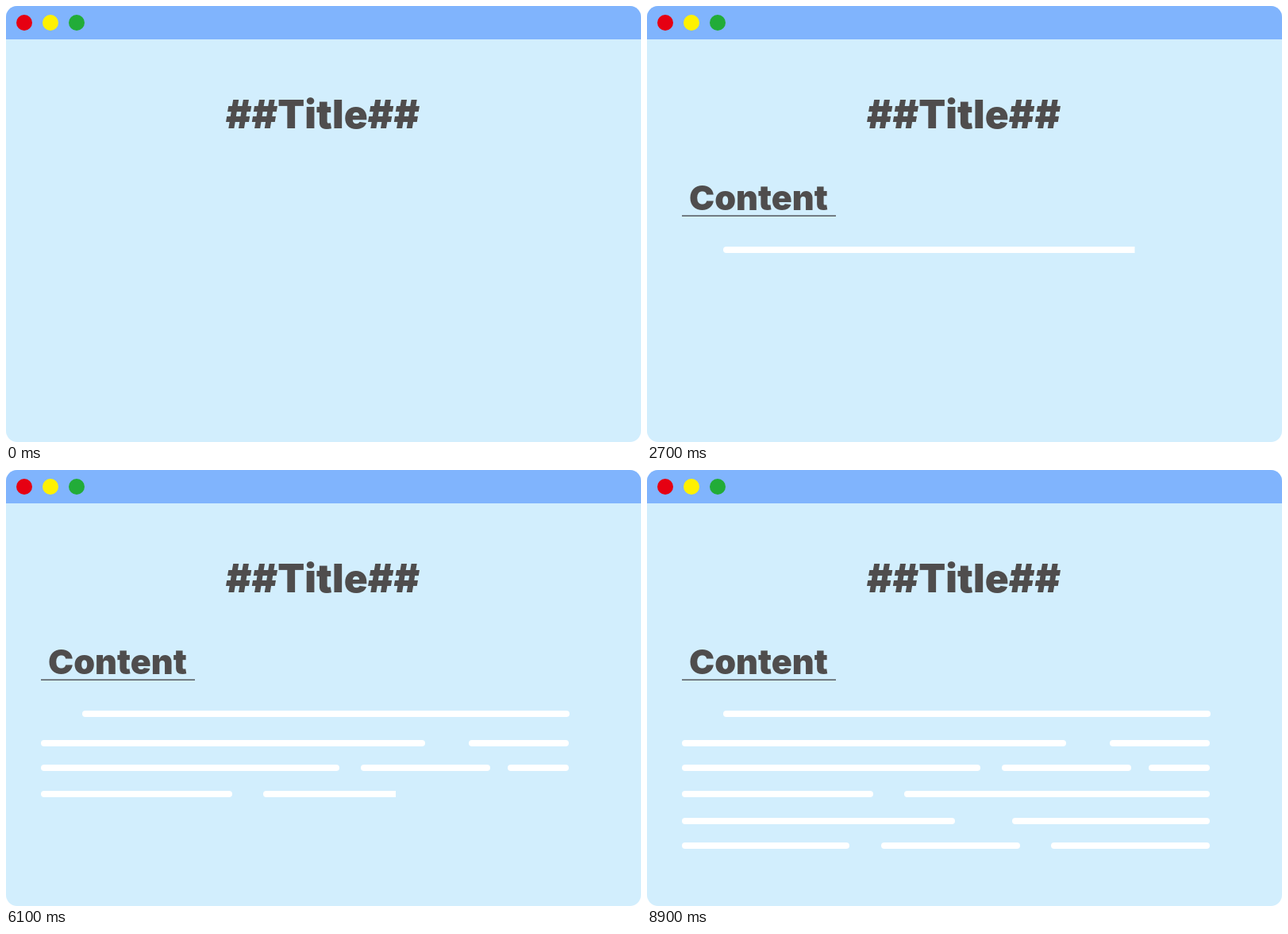
Recreate the animation shown at these times as an HTML page. Size 800x549 px, loop 9100 ms.

```html
<!DOCTYPE html>
<html lang="en">
<head>
<meta charset="utf-8">
<title>Page filling in</title>
<style>
  html, body { margin: 0; width: 100%; height: 100%; overflow: hidden; background: #fff; }
  svg { display: block; width: 800px; height: 549px; }
  text { font-family: Inter, "Liberation Sans", sans-serif; font-weight: 900; fill: #4f4d4d; }
</style>
</head>
<body>
<svg viewBox="0 0 800 549">
  <clipPath id="window"><rect width="800" height="549" rx="14"/></clipPath>
  <g clip-path="url(#window)">
    <rect width="800" height="549" fill="#d2eefd"/>
    <rect width="800" height="42" fill="#80b4fd"/>
  </g>
  <circle cx="23" cy="21" r="10" fill="#e60012"/>
  <circle cx="56" cy="21" r="10" fill="#fff100"/>
  <circle cx="89" cy="21" r="10" fill="#22ac38"/>
  <text x="399" y="154" font-size="49.5" text-anchor="middle">##Title##</text>
  <g class="row">
    <text x="140.5" y="256.5" font-size="43" text-anchor="middle">Content</text>
    <rect x="44" y="263.5" width="194" height="1.5" fill="#55585c"/>
  </g>
</svg>
<script>
const LOOP = 9100, START = 500, STEP = 200, STEPS_PER_ROW = 6, SPEED = 0.1722;
const svg = document.querySelector('svg');

// each line: top, then left and right end of every bar
const lines = [
  [303, 96, 710],
  [340, 44, 528, 583, 709],
  [371, 44, 420, 447, 610, 632, 709],
  [404, 44, 285, 324, 709],
  [438, 44, 388, 460, 709],
  [469, 44, 255, 295, 470, 509, 709]
];

function add(parent, tag, attrs) {
  const el = document.createElementNS('http://www.w3.org/2000/svg', tag);
  for (const key in attrs) el.setAttribute(key, attrs[key]);
  return parent.appendChild(el);
}

function wipe(group, left, right, lead = 0) {
  const id = 'wipe' + left + '-' + wipes.length;
  const mask = add(add(svg, 'clipPath', { id }), 'rect', { x: left, y: 0, width: 0, height: 549 });
  group.setAttribute('clip-path', `url(#${id})`);
  wipes.push({ mask, width: right - left, lead });
}

const wipes = [];
wipe(document.querySelector('.row'), 44, 238, 0.027);
for (const [y, ...ends] of lines) {
  const group = add(svg, 'g', { fill: '#fff' });
  for (let i = 0; i < ends.length; i += 2)
    add(group, 'rect', { x: ends[i], y, width: ends[i + 1] - ends[i], height: 8, rx: 4 });
  wipe(group, ends[0], ends[ends.length - 1]);
}

function draw(now) {
  const t = now % LOOP;
  const step = Math.floor((t - START) / STEP);
  wipes.forEach(({ mask, width, lead }, i) => {
    const part = 0.5 + SPEED * (step - STEPS_PER_ROW * (i + 0.5)) + lead;
    const shown = step < 0 ? 0 : Math.min(1, Math.max(0, part));
    mask.setAttribute('width', width * shown);
  });
}

const begin = performance.now();
function tick() {
  draw(performance.now() - begin);
  requestAnimationFrame(tick);
}
tick();
</script>
</body>
</html>
```
